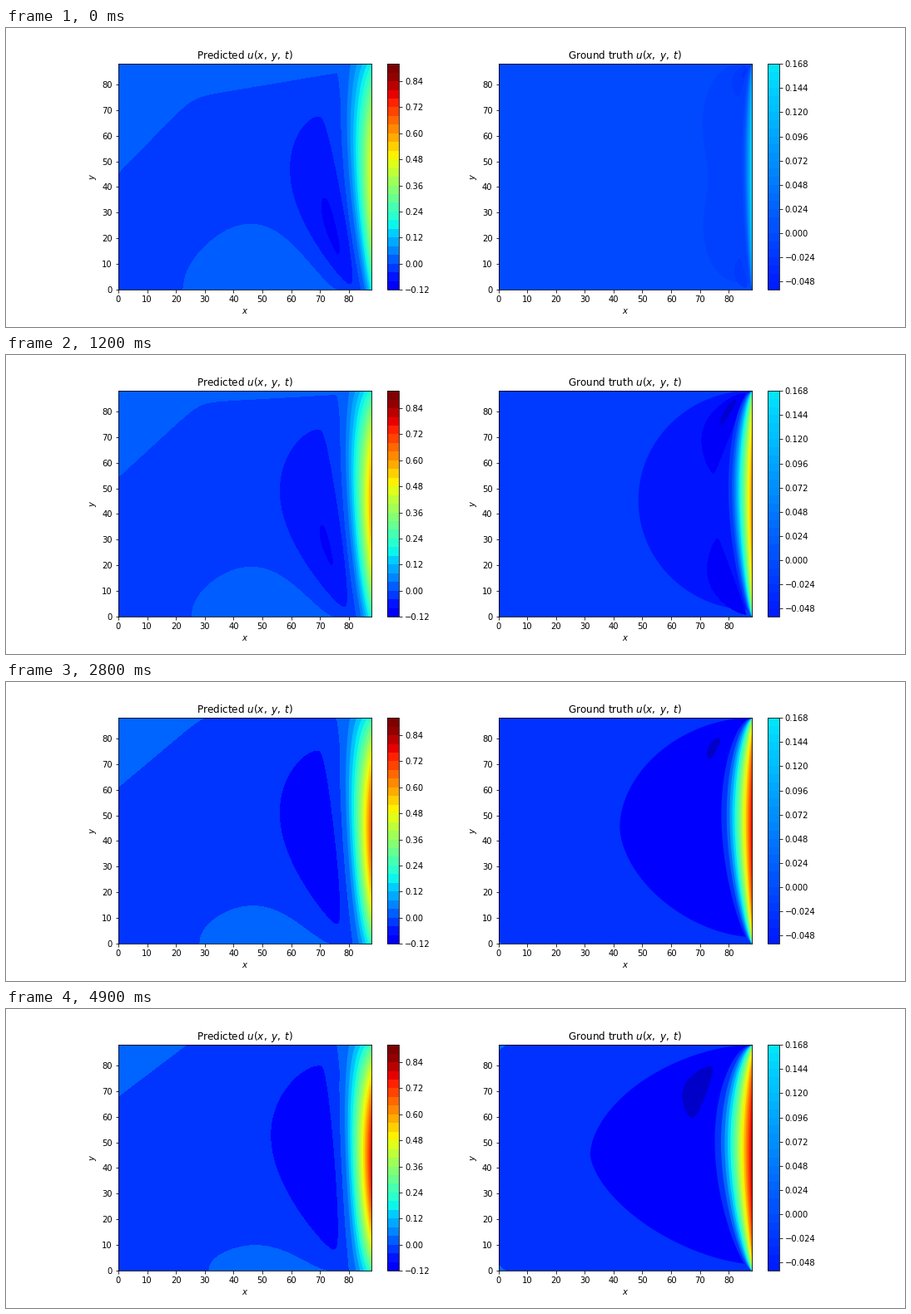
A matplotlib script that plays this animation: 1080x360 px, repeating every 5 s.

```python
import matplotlib.pyplot as plt
import numpy as np
from matplotlib.animation import FuncAnimation
from matplotlib.colors import Normalize

FRAMES, INTERVAL = 50, 100
SIZE = 88
Y = np.linspace(0, SIZE, 265)
NORM = Normalize(-0.22, 0.88, clip=True)
JET = plt.get_cmap("jet")


def color(value):
    return JET(float(NORM(value)))


def arch(s, skew=1.0):
    """Half sine wave over 0..1; a skew above 1 moves the peak to the right."""
    return np.clip(np.sin(np.pi * np.clip(s, 0, 1) ** skew), 0, 1)


def soft_min(*curves, k=2.0):
    low = np.minimum.reduce(curves)
    return low - k * np.log(sum(np.exp((low - c) / k) for c in curves))


def blob(ax, points, value):
    ax.fill(*np.asarray(points).T, color=color(value), lw=0, antialiased=False)


def leaf(bottom, top, left, right):
    """Leaf along the axis bottom-top, with its own bulge on either side."""
    s = 0.5 - 0.5 * np.cos(np.linspace(0, np.pi, 80))
    x = bottom[0] + (top[0] - bottom[0]) * s
    y = bottom[1] + (top[1] - bottom[1]) * s
    x1 = x - left * arch(s, 1.3) ** 0.6
    x2 = x + right * (4 * s * (1 - s)) ** 0.3
    return np.column_stack([np.r_[x1, x2[::-1]], np.r_[y, y[::-1]]])


def bands(ax, edge, step, first, top):
    """Fill from each level's curve to the right wall, lowest level first."""
    for k in range(first, int(top / step) + 1):
        ax.fill_betweenx(Y, edge(k * step), SIZE, color=color((k + 0.5) * step),
                         lw=0, antialiased=False)


def draw_predicted(ax, t):
    lift = (t / 4.9) ** 0.66
    late = t >= 2.35
    step = 0.05 if late else 0.04
    ax.set_facecolor(color(-step / 2))

    # Zero contour: slope, plateau and drop, then down along the wall
    x = np.linspace(0, 77.2, 150)
    slope = 45.6 + 22.4 * lift + (1.15 - 0.3 * lift) * x
    plateau = 70.2 + 0.19 * x + lift * (14 - 0.32 * (x - 48))
    ridge = soft_min(slope, plateau, 75 + 12 * (77.2 - x))
    start = 77.3 - 0.4 * lift + (7.1 - 3.8 * lift) * np.clip(1 - Y / 72, 0, 1) ** 1.8
    low = Y < 74
    line = np.column_stack([np.r_[x, start[low][::-1]], np.r_[ridge, Y[low][::-1]]])
    blob(ax, np.vstack([line, [(SIZE, 0), (SIZE, 120), (0, 120)]]), step / 2)

    # Bottom hill
    s = np.linspace(0, 1, 120)
    left, right = 22.5 + 9 * lift ** 1.2, 75.5 - 3.5 * lift
    height = (25.5 - 15.7 * lift) * arch(s, 0.85 - 0.1 * lift) ** (0.65 + 0.6 * s)
    blob(ax, np.column_stack([left + (right - left) * s, height]), step / 2)

    # Trough
    if late:
        u = (t - 2.8) / 2.1
        blob(ax, leaf((75.5 - 0.9 * u, 8 + 0.4 * u), (69 + 0.7 * u, 75 + 4.7 * u),
                      15.3 + 3.2 * u, 2.7), -1.5 * step)
    else:
        u = t / 1.9
        blob(ax, leaf((80 - 3 * u, 2.4 + 2.6 * u), (69.4, 67.3 + 8.7 * u),
                      13.5 + 4.7 * u, 2.7), -1.5 * step)
        blob(ax, leaf((76 - 3.4 * u, 14.2 + 9.8 * u), (71.4 - 1.4 * u, 35.6),
                      2 - 0.9 * u, 1.6 - 0.7 * u), -2.5 * step)

    # Hot right wall
    base, peak = 0.2 + 0.07 * lift, 0.5 + 0.31 * lift
    wall = base + (peak - base) * arch(Y / SIZE) ** 0.9

    def edge(level):
        return start + (SIZE - start) * np.clip(level / wall, 0, 1) ** (1 / 1.35)

    bands(ax, edge, step, 1, peak)


def draw_truth(ax, t):
    late = t >= 1.5
    step = 0.06 if late else round(min(0.04, 0.008 + 0.064 * t), 3)
    ax.set_facecolor(color(-step / 2))

    # Bowl bulging from the right wall
    if late:
        reach = 40 * (t / 1.9) ** 0.36
        power = 2 - 0.068 * (t - 1.2) - 0.15 * (Y < 45.5)
    else:
        reach = 18.3 + 17.7 * t
        power = max(2, 3 - t / 0.8)
    off = np.clip(np.abs(Y - 45.5) / 42.8, 0, 1)
    depth = reach * (1 - off ** power) ** (1 / power)
    depth -= 3 * max(0, 1 - t / 0.5) * np.exp(-((Y - 44) / 15) ** 2)
    ax.fill_betweenx(Y, SIZE - np.maximum(depth, 0), SIZE, color=color(-1.5 * step),
                     lw=0, antialiased=False)

    if late:
        u = max(0, (t - 2.8) / 2.1)
        grow = np.clip((t - 2.4) / 0.4, 0, 1)
        top = np.array([76.3 - 2.8 * u, 79.8 - 0.3 * u])
        bottom = top - grow * np.array([3.3 + 3.2 * u, 7.4 + 12.3 * u])
        if grow > 0:
            blob(ax, leaf(bottom, top, grow * (1.8 + 4.5 * u), grow * (1.2 + 0.7 * u)),
                 -2.5 * step)
        c = 2.2 * (t - 1.5) / 3.4
        blob(ax, [(0, 0), (c, 0), (0, c)], step / 2)
        blob(ax, [(0, SIZE), (c, SIZE), (0, SIZE - c)], step / 2)
    else:
        u = t / 1.2
        lobe = leaf((83 - 8.3 * u, 75.4 - 19.4 * u), (85.4, 87),
                    3 + 6.4 * u, 0.9 - 0.4 * u)
        blob(ax, lobe, -2.5 * step)
        x, y = lobe.T
        blob(ax, np.column_stack([x + 0.11 * (SIZE - x), 0.95 * (SIZE - y)]), -2.5 * step)
        blob(ax, leaf((84.8 - 7.8 * u, 83 - 8 * u), (86.2 - 4.2 * u, 86 - 1.5 * u),
                      0.5 + 0.6 * u, 0.5 + 0.5 * u), -3.5 * step)

    # Hot right wall
    peak = 0.168 + 0.66 * (1 - np.exp(-t))
    width = (3.6 + 9.4 * (t / 4.9) ** 0.5) * arch(Y / SIZE, 1.25) ** 0.5
    wall = peak * arch(Y / SIZE) ** 0.22

    def edge(level):
        v = np.clip((level + step) / (wall + step), 0, 1)
        return SIZE - width * (1 - v ** (1 / 1.5))

    bands(ax, edge, step, -1, peak)


def add_bar(ax, first, step, count, ticks, fmt):
    cs = ax.contourf([[0, 0], [0, 0]], levels=first + step * np.arange(count + 1),
                     cmap=JET, norm=NORM)
    bar = fig.colorbar(cs, ax=ax)
    bar.set_ticks(ticks, labels=[fmt.format(v + 0.0).replace("-", "\u2212") for v in ticks])
    bar.ax.minorticks_off()
    cs.remove()


fig, axes = plt.subplots(1, 2, figsize=(15, 5), dpi=72)
fig.subplots_adjust(left=0.125, right=0.9, bottom=0.125, top=0.88, wspace=0.2)
add_bar(axes[0], -0.12, 0.04, 26, np.round(0.12 * np.arange(-1, 8), 2), "{:.2f}")
add_bar(axes[1], -0.056, 0.008, 28, np.round(0.024 * np.arange(-2, 8), 3), "{:.3f}")

for ax, name in zip(axes, ("Predicted", "Ground truth")):
    ax.set_title(name + r" $u(x,\;y,\;t)$")
    ax.set_xlabel("$x$")
    ax.set_ylabel("$y$")
    ax.set_xticks(range(0, 81, 10))
    ax.set_yticks(range(0, 81, 10))


def draw(i):
    t = i * INTERVAL / 1000
    for ax, paint in zip(axes, (draw_predicted, draw_truth)):
        for artist in [*ax.patches, *ax.collections]:
            artist.remove()
        paint(ax, t)
        ax.set_xlim(0, SIZE)
        ax.set_ylim(0, SIZE)


anim = FuncAnimation(fig, draw, frames=FRAMES, interval=INTERVAL, repeat=True)
plt.show()
```
